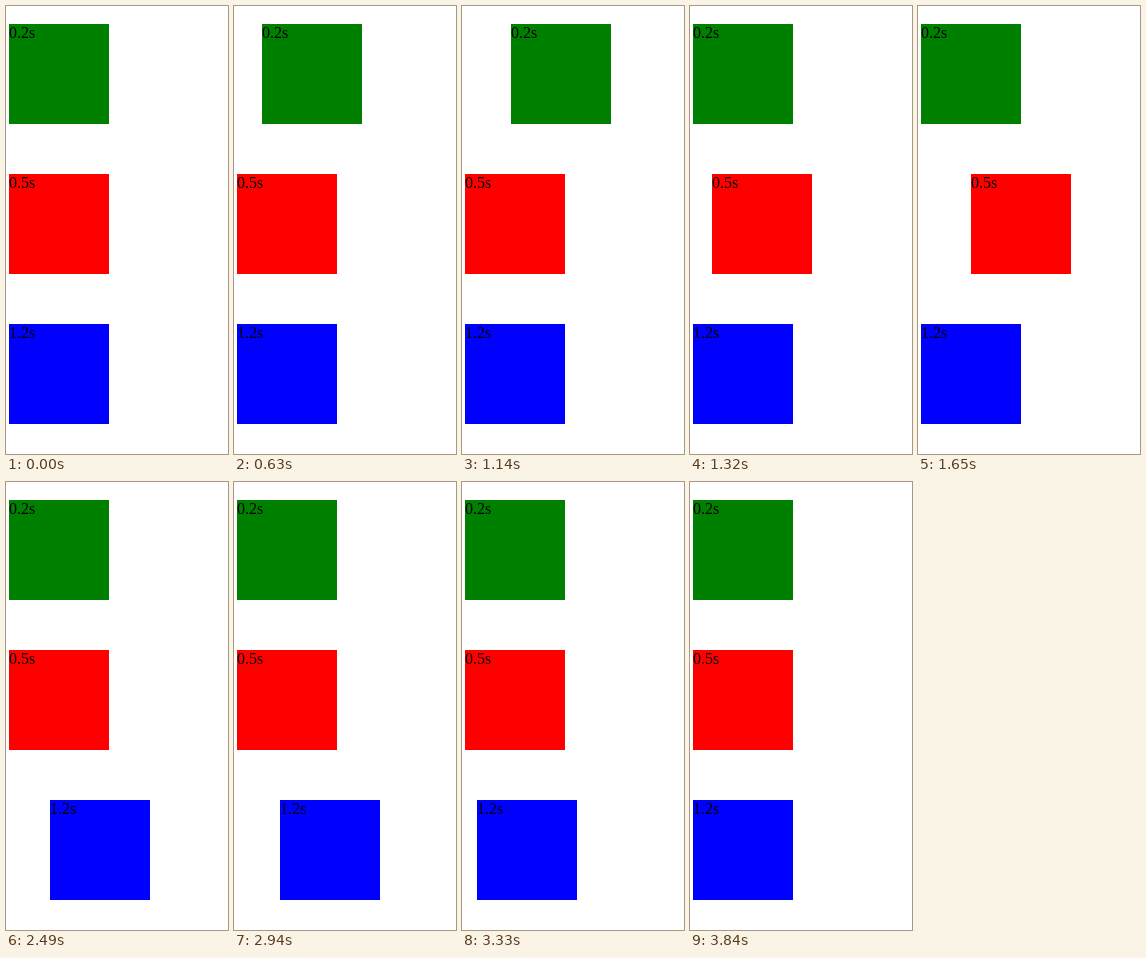
Animation, 222 px wide and 448 px high, one loop 3.87 s. Source, as an HTML page:

```html
<!DOCTYPE html>
<html lang="en">
<head>
<meta charset="utf-8">
<title>Transition durations</title>
<style>
  html, body { margin: 0; width: 100%; height: 100%; overflow: hidden; background: #fff; }
  div {
    position: absolute;
    left: 3px;
    width: 100px;
    height: 100px;
    font: 16px "Liberation Serif", "Times New Roman", serif;
    color: #000;
  }
</style>
</head>
<body>
<script>
const LOOP = 3870, STEP = 30, HOME = 3;

// Each move: [time, duration, from, to, time already elapsed when it shows]
const boxes = [
  { label: "0.2s", color: "green", top: 18, moves: [[571, 200, 0, 50], [1122, 200, 50, 0]] },
  { label: "0.5s", color: "red", top: 168, moves: [[1200, 500, 0, 50], [1860, 500, 50, 0, 68]] },
  { label: "1.2s", color: "blue", top: 318, moves: [[1871, 1200, 0, 50], [2808, 1168, 48.8, 0]] },
];

for (const box of boxes) {
  box.element = document.body.appendChild(document.createElement("div"));
  box.element.textContent = box.label;
  box.element.style.background = box.color;
  box.element.style.top = box.top + "px";
}

const bezier = (s, a, b) => 3 * a * s * (1 - s) ** 2 + 3 * b * s * s * (1 - s) + s ** 3;

// CSS "ease": cubic-bezier(.25, .1, .25, 1)
function ease(x) {
  if (x <= 0 || x >= 1) return x <= 0 ? 0 : 1;
  let low = 0, high = 1;
  for (let i = 0; i < 24; i++) {
    const mid = (low + high) / 2;
    if (bezier(mid, 0.25, 0.25) < x) low = mid;
    else high = mid;
  }
  return bezier(low, 0.1, 1);
}

function offset(moves, time) {
  const move = moves.filter(([at]) => at <= time).pop();
  if (!move) return 0;
  const [at, duration, from, to, lead = 0] = move;
  return from + (to - from) * ease((time - at + lead) / duration);
}

const start = performance.now();

function draw() {
  const elapsed = Math.max(0, performance.now() - start) % LOOP;
  const time = Math.floor(elapsed / STEP) * STEP;
  for (const { element, moves } of boxes) {
    element.style.left = HOME + Math.round(offset(moves, time)) + "px";
  }
  requestAnimationFrame(draw);
}
draw();
</script>
</body>
</html>
```
